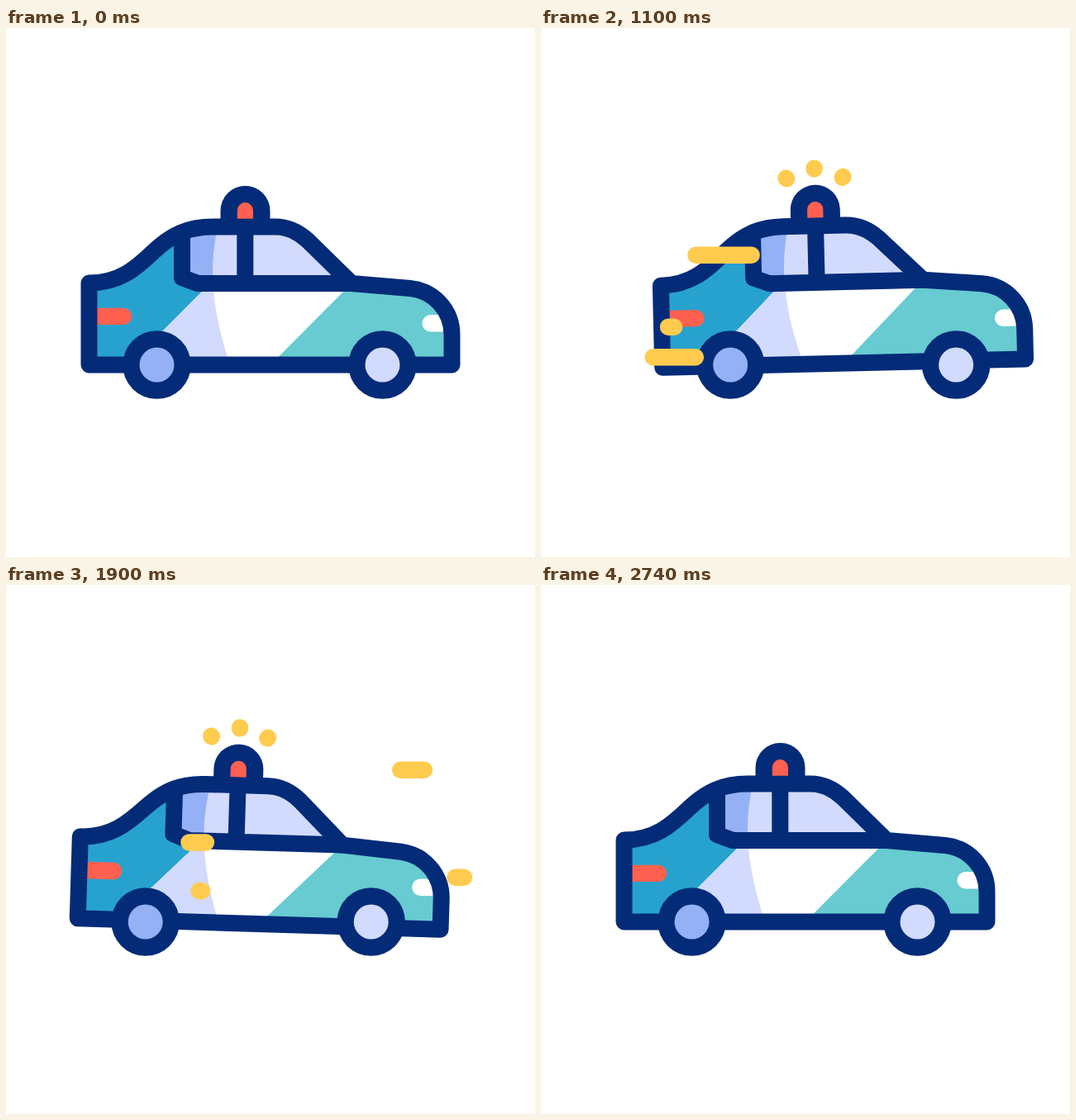
Recreate the animation shown at these times as an HTML page. Size 640 px wide and 640 px high, loop 2.8 s.

```html
<!DOCTYPE html>
<html lang="en">
<head>
<meta charset="utf-8">
<title>Police car</title>
<style>
  html, body { margin: 0; width: 100%; height: 100%; overflow: hidden; background: #fff; }
  svg { display: block; width: 100%; height: 100%; }
  .navy { fill: #032b78; }
  .outline { fill: none; stroke: #032b78; stroke-width: 20; stroke-linejoin: round; stroke-linecap: round; }
  .pale { fill: #d2dbfd; }
  .shade { fill: #94b1f5; }
  .red { fill: #ff6050; }
  .glow { stroke: #ffcb4f; stroke-width: 20.5; stroke-linecap: round; }
</style>
</head>
<body>
<svg viewBox="0 0 640 640">
  <defs>
    <path id="shell" d="M100.5 407.5V308.5C138 308.5 158 290 178 271C200 250 220 240.5 250 240.5H326C342 240.5 354 247 365 257L418 309L489 315C518 318 539.5 342 539.5 371V407.5Z"/>
    <clipPath id="inside"><use href="#shell"/></clipPath>
  </defs>
  <g id="car">
    <g id="body">
      <g clip-path="url(#inside)">
        <path fill="#27a2ce" d="M90 230H326L149 407.5H90Z"/>
        <path fill="#fff" d="M247 309H418L319.5 407.5H149Z"/>
        <path class="pale" d="M247 309H250.5C252 342 260 374 271 407.5H149Z"/>
        <path fill="#67cbd1" d="M418 309H550V408H319.5Z"/>
        <path class="pale" d="M213 235H380L418 309H232L213 302Z"/>
        <path class="shade" d="M213 235H257C251 265 249 285 250.5 309H232L213 302Z"/>
        <path class="red" d="M100 338.7H142a10.2 10.2 0 0 1 0 20.4H100Z"/>
        <path fill="#fff" d="M540 347H513.7a10.2 10.2 0 0 0 0 20.4H540Z"/>
      </g>
      <path class="outline" d="M213 252V302L232 309H418M289.3 245V305"/>
      <use href="#shell" class="outline"/>
      <path class="navy" d="M259.5 238V221a30 30 0 0 1 60 0V238Z"/>
      <path class="red" d="M279.8 230.7V220.7a9.6 9.6 0 0 1 19.2 0V230.7Z"/>
      <g id="rays"></g>
    </g>
    <circle class="navy" cx="182.5" cy="407.5" r="41.3"/>
    <circle class="shade" cx="182.5" cy="407.5" r="21"/>
    <circle class="navy" cx="455.5" cy="407.5" r="41.3"/>
    <circle class="pale" cx="455.5" cy="407.5" r="21"/>
  </g>
  <g id="streaks"></g>
</svg>
<script>
const LOOP = 2800;
const get = id => document.getElementById(id);
const clamp = v => Math.min(1, Math.max(0, v));
const sine = v => (1 - Math.cos(Math.PI * clamp(v))) / 2;

// Quick settle: cubic-bezier(.33, 0, .5, 1), solved by bisection
function settle(v) {
  let lo = 0, hi = 1, s = .5;
  for (let i = 0; i < 18; i++) {
    s = (lo + hi) / 2;
    const r = 1 - s;
    const x = .99 * r * r * s + 1.5 * r * s * s + s * s * s;
    if (x < v) lo = s; else hi = s;
  }
  return s * s * (3 - 2 * s);
}

// Keys are [time, value, easing into this key]
const drive = [[220, 0], [1190, 47.2, settle], [2180, -27.5], [2735, 0]];
const tilt = [[220, 0], [540, 1.6], [1180, -1.45], [1830, 1.82], [2470, -.38], [2735, 0]];

function at(keys, t) {
  if (t <= keys[0][0]) return keys[0][1];
  for (let i = 1; i < keys.length; i++) {
    const [t0, v0] = keys[i - 1], [t1, v1, ease = sine] = keys[i];
    if (t < t1) return v0 + (v1 - v0) * ease((t - t0) / (t1 - t0));
  }
  return keys[keys.length - 1][1];
}

const trails = [];
function addTrail(parent, x1, y1, x2, y2, starts) {
  const el = document.createElementNS("http://www.w3.org/2000/svg", "line");
  el.setAttribute("class", "glow");
  get(parent).append(el);
  trails.push({ el, x1, y1, x2, y2, starts });
}

const pulses = [240, 1040, 1840];
addTrail("rays", 255.7, 182.7, 237.8, 159.6, pulses);
addTrail("rays", 289.5, 171.7, 289.5, 142.5, pulses);
addTrail("rays", 323.3, 182.7, 341.2, 159.6, pulses);

// Start time, height, right end, length
[
  [300, 259, 442, 110], [300, 389, 433.5, 106], [400, 361.7, 304, 150],
  [810, 398.3, 201, 123], [835, 274.8, 268.5, 176], [1265, 311.5, 371.5, 150],
  [1720, 223.7, 506.6, 124], [1795, 353.7, 554, 121], [1850, 370, 237, 168]
].forEach(([start, y, x, len]) => addTrail("streaks", x, y, x - len, y, [start]));

// The head runs ahead and the tail catches up
function drawTrail({ el, x1, y1, x2, y2, starts }, t) {
  const start = starts.find(s => t > s && t < s + 790);
  const age = start === undefined ? 0 : t - start;
  const head = sine(age / 560), tail = sine((age - 150) / 640);
  const on = head - tail > .002;
  el.style.display = on ? "" : "none";
  if (!on) return;
  el.setAttribute("x1", x1 + (x2 - x1) * tail);
  el.setAttribute("y1", y1 + (y2 - y1) * tail);
  el.setAttribute("x2", x1 + (x2 - x1) * head);
  el.setAttribute("y2", y1 + (y2 - y1) * head);
}

function draw() {
  const t = performance.now() % LOOP;
  get("car").setAttribute("transform", `translate(${at(drive, t)} 0)`);
  get("body").setAttribute("transform", `rotate(${at(tilt, t)} 237 407.5)`);
  trails.forEach(trail => drawTrail(trail, t));
  requestAnimationFrame(draw);
}
draw();
</script>
</body>
</html>
```
